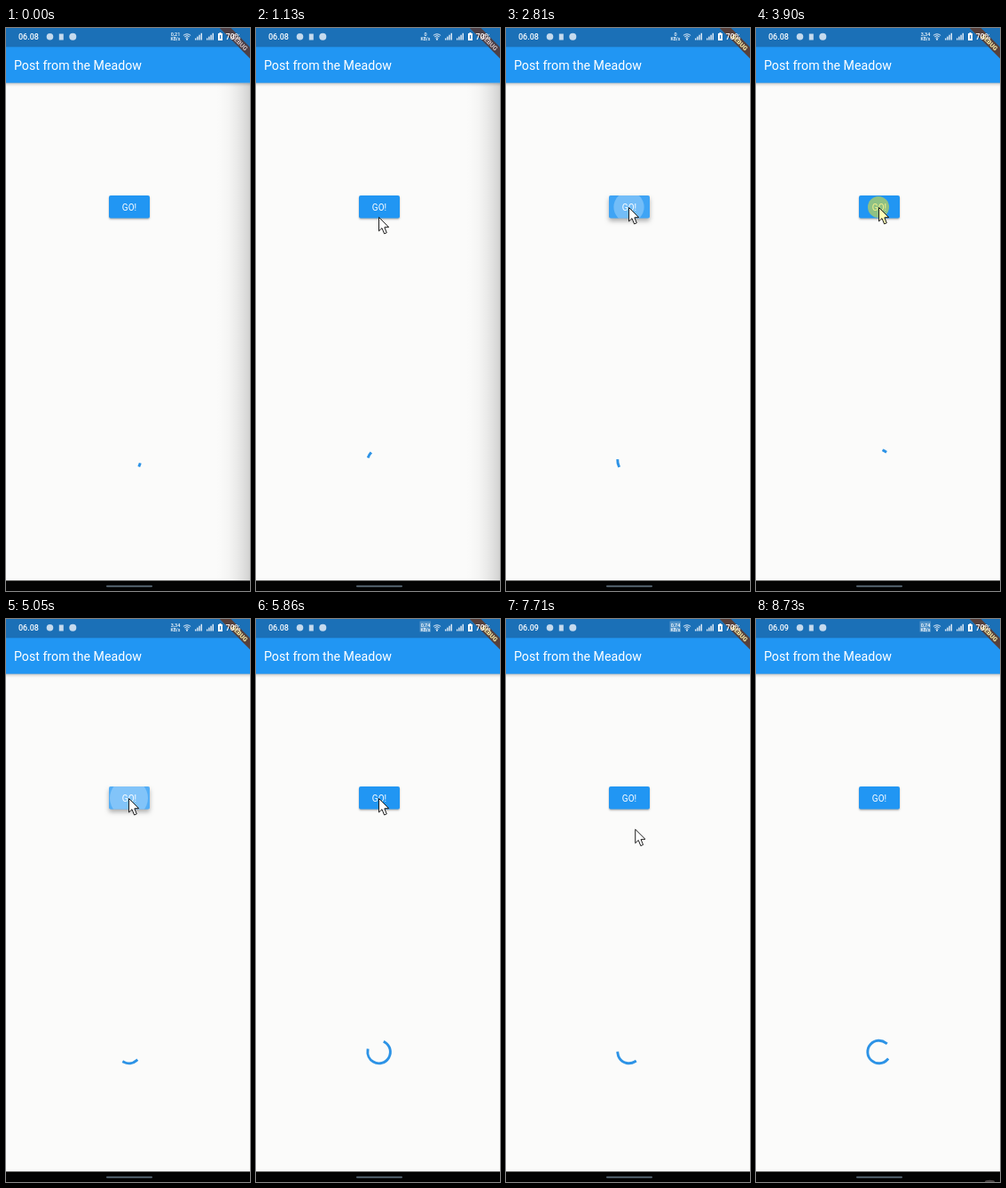
Write an HTML page with a canvas that moves like this. It is 275 px wide and 632 px high and loops after 8800 ms.

```html
<!DOCTYPE html>
<html lang="en">
<head>
<meta charset="utf-8">
<style>
html, body { margin: 0; width: 100%; height: 100%; overflow: hidden; background: #fafafa; }
canvas { display: block; }
</style>
</head>
<body>
<canvas width="275" height="632"></canvas>
<script>
const ctx = document.querySelector('canvas').getContext('2d');
const LOOP = 8800, TAU = Math.PI * 2, DEG = Math.PI / 180;
const CLICKS = [2600, 3860, 4750, 5900];
const SPEEDS = [[0, '0,21'], [700, '0'], [3100, '3,34'], [5800, '0,74']];
// [time, spinner cycles]
const TURNS = [[0, -1.1], [1130, -.16], [2810, 1.09], [3900, 1.877], [5050, 2.737], [6840, 4.055], [8730, 5.43], [8800, 5.48]];
// [time, x, y] of the pointer tip
const POINTER = [[300, 276, 566], [480, 232, 475], [700, 178, 345], [920, 142, 238], [1130, 138, 212],
  [1350, 138, 201], [7660, 138, 201], [7850, 165, 330], [8100, 224, 625], [8160, 236, 650]];

const clamp = v => Math.min(1, Math.max(0, v));

function along(keys, t) {
  let i = 1;
  while (i < keys.length - 1 && keys[i][0] < t) i++;
  const a = keys[i - 1], b = keys[i], u = clamp((t - a[0]) / (b[0] - a[0]));
  return a.slice(1).map((v, k) => v + (b[k + 1] - v) * u);
}

// cubic-bezier(.4, 0, .2, 1)
function ease(x) {
  x = clamp(x);
  let lo = 0, hi = 1;
  for (let i = 0; i < 20; i++) {
    const s = (lo + hi) / 2, r = 1 - s;
    if (1.2 * r * r * s + .6 * r * s * s + s * s * s < x) lo = s; else hi = s;
  }
  return lo * lo * (3 - 2 * lo);
}

function rect(x, y, w, h, fill) {
  ctx.fillStyle = fill;
  ctx.fillRect(x, y, w, h);
}

function disc(x, y, r, fill) {
  ctx.fillStyle = fill;
  ctx.beginPath();
  ctx.arc(x, y, r, 0, TAU);
  ctx.fill();
}

function text(str, x, y, font, fill = '#fff', align = 'left') {
  ctx.font = font + ' Roboto, sans-serif';
  ctx.fillStyle = fill;
  ctx.textAlign = align;
  ctx.fillText(str, x, y);
}

// Black gradient whose alpha falls off quadratically
function shade(x0, y0, x1, y1, alpha) {
  const g = ctx.createLinearGradient(x0, y0, x1, y1);
  for (let u = 0; u <= 1; u += .125) g.addColorStop(u, `rgba(0,0,0,${alpha * (1 - u) ** 2})`);
  return g;
}

function signal(x) {
  for (let i = 0; i < 4; i++) rect(x + i * 2.2, 11.5 - i * 1.9, 1.4, 2 + i * 1.9, '#e4eef8');
}

function statusIcons(t) {
  text(t < 5900 ? '06.08' : '06.09', 14, 13.3, '500 9px');
  disc(49.5, 9.8, 3.8, '#c4daee');
  rect(59.8, 6.5, 5, 7, '#c4daee');
  disc(75.3, 9.8, 4, '#c4daee');
  if (t >= 5800) rect(184.5, 2.5, 12.5, 12, 'rgba(255,255,255,.22)');
  text(SPEEDS.filter(s => s[0] <= t).pop()[1], 191, 9, '500 5.5px', '#fff', 'center');
  text('KB/s', 191, 14, '500 5px', '#fff', 'center');
  ctx.strokeStyle = '#e4eef8';
  ctx.lineWidth = 1;
  for (const r of [2.2, 4.2, 6.2]) {
    ctx.beginPath();
    ctx.arc(204, 13, r, -2.3, -.84);
    ctx.stroke();
  }
  disc(204, 12.7, 1, '#e4eef8');
  signal(213);
  signal(226);
  rect(239, 6, 5, 8, '#fff');
  rect(240.5, 5, 2, 1, '#fff');
  rect(241, 8, 1, 4, '#1b70b7');
  text('70%', 247.5, 13.3, '500 9px');
}

function banner(t) {
  const early = t < 1400;
  ctx.save();
  ctx.translate(263, 16.5);
  ctx.rotate(Math.PI / 4);
  rect(-40, -5, 80, 9, early ? '#4c4048' : '#56403c');
  text('DEBUG', 0, 2.2, (early ? '500' : '900') + ' 7px', early ? '#eddcdc' : '#f6e9a4', 'center');
  ctx.restore();
}

function buttonPath() {
  ctx.beginPath();
  ctx.roundRect(116, 188, 46, 25.5, 2);
}

function button(age) {
  const u = age - 90;
  const gone = 1 - clamp((u - 260) / 240);
  const lift = u > 0 ? clamp(u / 100) * gone : 0;
  ctx.save();
  ctx.shadowColor = 'rgba(0,0,0,.3)';
  ctx.shadowBlur = 2 + 3.5 * lift;
  ctx.shadowOffsetY = 1.2 + 2 * lift;
  ctx.fillStyle = '#2196f3';
  buttonPath();
  ctx.fill();
  ctx.restore();
  if (u > 0 && gone > 0) {
    ctx.save();
    buttonPath();
    ctx.clip();
    rect(116, 188, 46, 26, `rgba(255,255,255,${.24 * clamp(u / 220) * gone})`);
    disc(138.5, 201, 8 + 16 * (1 - (1 - clamp(u / 350)) ** 2), `rgba(255,255,255,${.27 * clamp(u / 75) * gone})`);
    ctx.restore();
  }
  text('GO!', 139, 204.6, '400 10px', '#fff', 'center');
}

function spinner(t) {
  const x = along(TURNS, t)[0], n = Math.floor(x), p = x - n;
  const head = ease(p * 2), tail = ease(p * 2 - 1);
  const start = (-90 + 576 * n + 306 * p + 270 * tail) * DEG;
  ctx.strokeStyle = '#2d93e6';
  ctx.lineWidth = 2.9;
  ctx.lineCap = 'square';
  ctx.beginPath();
  ctx.arc(138.6, 486, 12.8, start, start + Math.max(270 * (head - tail) * DEG, .01));
  ctx.stroke();
  ctx.lineCap = 'butt';
}

function pointer(t, pressed) {
  if (t < 300 || t > 8160) return;
  const [x, y] = along(POINTER, t);
  if (pressed) disc(x, y, 12, 'rgba(245,232,30,.52)');
  ctx.save();
  ctx.translate(x, y);
  ctx.beginPath();
  for (const [px, py] of [[.5, .5], [.5, 16], [4, 12.7], [6.6, 19], [9.3, 17.8], [6.8, 11.8], [11.7, 11.6]]) ctx.lineTo(px, py);
  ctx.closePath();
  ctx.fillStyle = pressed ? '#ffffb4' : '#fff';
  ctx.fill();
  ctx.strokeStyle = '#1c1c1c';
  ctx.lineWidth = 1;
  ctx.stroke();
  ctx.restore();
}

function draw(t) {
  const age = t - (CLICKS.filter(c => c <= t).pop() ?? -LOOP);
  rect(0, 0, 275, 632, '#fbfbfa');
  if (t < 1400) rect(235, 62, 40, 558, shade(275, 0, 235, 0, .17));
  rect(0, 61, 275, 6, shade(0, 61, 0, 67, .28));
  rect(0, 21, 275, 40.6, '#2196f3');
  rect(0, 0, 275, 21.3, '#1b70b7');
  text('Post from the Meadow', 9, 47, '14.2px');
  banner(t);
  statusIcons(t);
  button(age);
  spinner(t);
  rect(0, 620.3, 275, 12, '#030303');
  ctx.fillStyle = '#5f707e';
  ctx.beginPath();
  ctx.roundRect(113, 625.7, 52, 1.8, 1);
  ctx.fill();
  if (t > 8170) {
    ctx.fillStyle = '#4a4545';
    ctx.beginPath();
    ctx.ellipse(263.5, 631.5, 5.5, 1.8, 0, 0, TAU);
    ctx.fill();
  }
  pointer(t, age < 110);
}

const begin = performance.now();
function tick() {
  draw((performance.now() - begin) % LOOP);
  requestAnimationFrame(tick);
}
tick();
</script>
</body>
</html>
```
